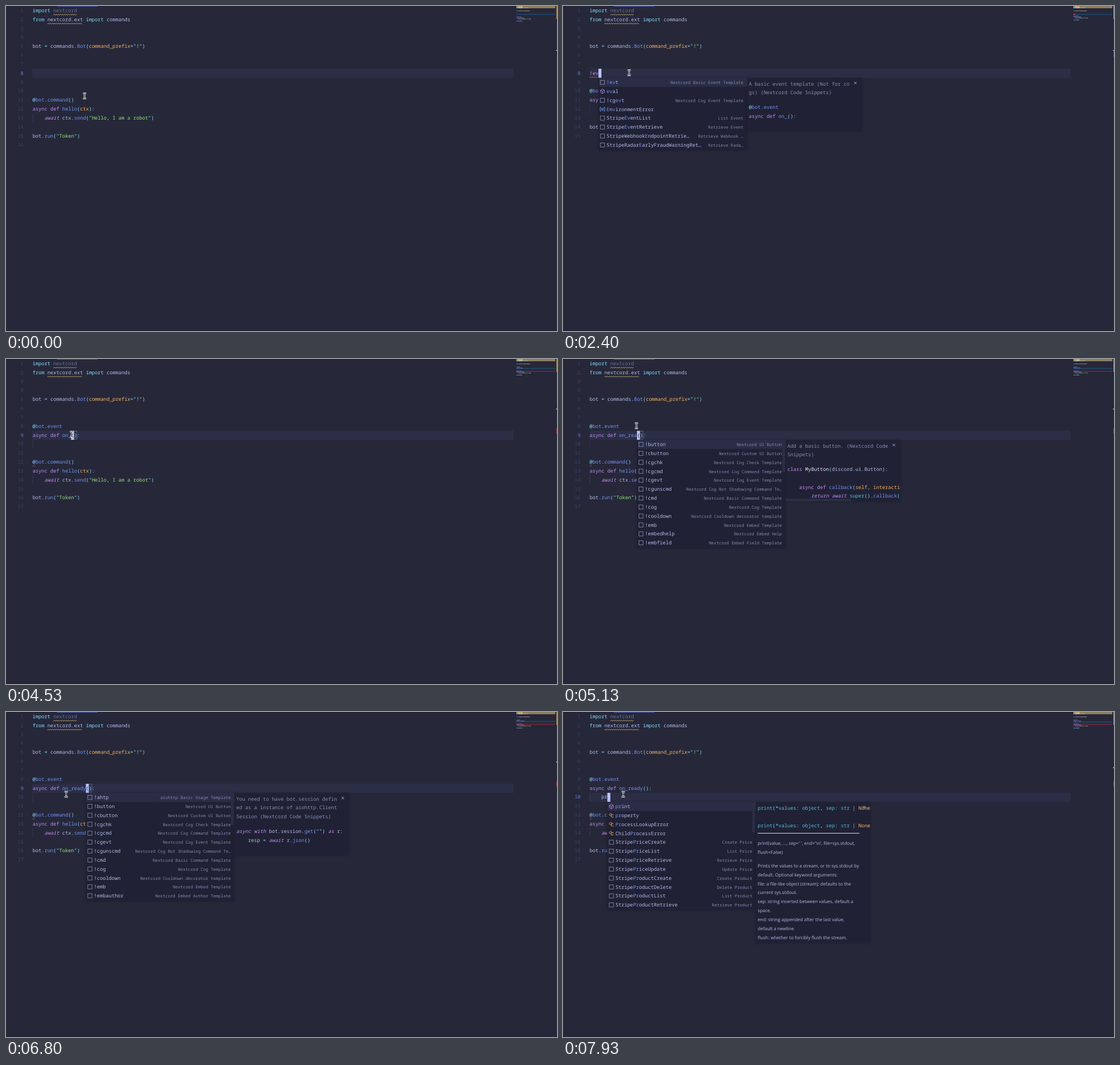
An HTML page with a canvas for the animation above (8 s loop, 975 by 575 pixels).

```html
<!DOCTYPE html>
<html lang="en">
<head>
<meta charset="utf-8">
<title>Editor session</title>
<style>
  html, body { margin: 0; height: 100%; overflow: hidden; background: #26283a; }
  canvas { display: block; }
</style>
</head>
<body>
<canvas id="stage" width="975" height="575"></canvas>
<script>
const ctx = document.getElementById('stage').getContext('2d');
const LOOP = 8000, LEFT = 47, CHAR = 5.244, ROW = 15.83;
const MONO = '8.74px "Noto Sans Mono", monospace';
const SMALL = '7.43px "Noto Sans Mono", monospace';
const SANS = '8.03px "Open Sans", sans-serif';

// Colour keys used after "~" in marked-up text; "i" is also italic.
const COLORS = {
  f: '#b4bce6', c: '#86dcfa', b: '#7492f2', p: '#c48cf2', i: '#c48cf2', o: '#f8b45c',
  n: '#94e478', g: '#6c7196', d: '#8a8fb4', t: '#50c2dc', w: '#e4e8ff'
};

const HEAD = [
  '~cimport ~gnextcord',
  '~cfrom ~fnextcord~c.~fext ~cimport ~fcommands',
  '', '',
  'bot ~c= ~fcommands~c.~bBot~c(~ocommand_prefix~c="~n!~c")',
  '', ''
];
const TAIL = [
  '~c@~bbot~c.~bcommand~c()',
  '~pasync def ~bhello~c(~octx~c):',
  '    ~iawait ~fctx~c.~bsend~c("~nHello, I am a robot~c")',
  '',
  'bot~c.~brun~c("~nToken~c")',
  ''
];

// Completion rows: label|detail|icon, with matched letters in brackets.
const SNIPPETS = [
  '!button|Nextcord UI Button', '!cbutton|Nextcord Custom UI Button',
  '!cgchk|Nextcord Cog Check Template', '!cgcmd|Nextcord Cog Command Template',
  '!cgevt|Nextcord Cog Event Template', '!cgunscmd|Nextcord Cog Not Shadowing Command Te…',
  '!cmd|Nextcord Basic Command Template', '!cog|Nextcord Cog Template',
  '!cooldown|Nextcord Cooldown decorator template', '!emb|Nextcord Embed Template'
];
const POPUPS = {
  all: {
    rows: ['!ahtp|aiohttp Basic Usage Template', ...SNIPPETS, '!embauthor|Nextcord Embed Author Template'],
    slider: 56, height: 111,
    blocks: [
      [10.5, MONO, ['~dYou need to have bot.session defin', '~ded as a instance of aiohttp.Client', '~dSession (Nextcord Code Snippets)']],
      [68, MONO, ['~iasync with ~fbot.session.~bget~c("") ~ias ~fr:', '    resp ~c= ~iawait ~fr.~bjson~c()']]
    ]
  },
  event: {
    rows: [
      '[!ev]t|Nextcord Basic Event Template', '[ev]al||cube', '!cg[ev]t|Nextcord Cog Event Template',
      '[E]n[v]ironmentError||value', 'Stripe[Ev]entList|List Event', 'Stripe[Ev]entRetrieve|Retrieve Event',
      'StripeWebhook[E]ndpointRetrie…|Retrieve Webhook …', 'StripeRadar[E]arlyFraudWarningRet…|Retrieve Rada…'
    ],
    slider: 0, height: 95,
    blocks: [
      [10.5, MONO, ['~dA basic event template (Not for co', '~dgs) (Nextcord Code Snippets)']],
      [52, MONO, ['~c@~bbot~c.~bevent', '~pasync def ~bon_~c():']]
    ]
  },
  button: {
    rows: [...SNIPPETS, '!embedhelp|Nextcord Embed Help', '!embfield|Nextcord Embed Field Template'],
    slider: 56, height: 110, scrollX: 116,
    blocks: [
      [10.5, MONO, ['~dAdd a basic button. (Nextcord Code', '~dSnippets)']],
      [52, MONO, ['~pclass ~wMyButton~c(~fdiscord~c.~fui~c.~fButton~c):', '',
        '    ~pasync def ~bcallback~c(~oself~c, ~ointeraction~c):',
        '        ~ireturn await ~tsuper~c().~bcallback~c(interaction)']]
    ]
  },
  print: {
    rows: [
      '[pr]int||cube', '[pr]operty||class', '[Pr]ocessLookupError||class', 'Child[Pr]ocessError||class',
      'Stripe[Pr]iceCreate|Create Price', 'Stripe[Pr]iceList|List Price', 'Stripe[Pr]iceRetrieve|Retrieve Price',
      'Stripe[Pr]iceUpdate|Update Price', 'Stripe[Pr]oductCreate|Create Product', 'Stripe[Pr]oductDelete|Delete Product',
      'Stripe[Pr]oductList|List Product', 'Stripe[Pr]oductRetrieve|Retrieve Product'
    ],
    slider: 53, height: 250, rule: 55,
    blocks: [
      [10.5, MONO, ['~tprint~c(*~tvalues~c: ~tobject~c, ~tsep~c: ~tstr ~f| ~oNone', '',
        '~tprint~c(*~tvalues~c: ~tobject~c, ~tsep~c: ~tstr ~f| ~oNone']],
      [73, SANS, ["print(value, ..., sep=' ', end='\\n', file=sys.stdout,", 'flush=False)']],
      [113, SANS, ['Prints the values to a stream, or to sys.stdout by', 'default. Optional keyword arguments:',
        'file: a file-like object (stream); defaults to the', 'current sys.stdout.',
        'sep: string inserted between values, default a', 'space.',
        'end: string appended after the last value,', 'default a newline.',
        'flush: whether to forcibly flush the stream.']]
    ]
  }
};

const MOUSE = [
  [0, 139, 159], [70, 139, 159], [270, 111, 132], [470, 111, 132], [670, 116, 125], [870, 116, 125],
  [930, 117, 118], [3400, 117, 118], [3800, 60, 140], [4200, 116, 140], [4470, 116, 133], [4600, 116, 133],
  [4730, 130, 118], [5670, 130, 118], [6470, 120, 130], [6530, 120, 130], [6800, 106.5, 145.5], [LOOP, 106.5, 145.5]
];

// Steps are [time, value]; the last one reached holds.
const held = (t, steps) => steps.filter(s => t >= s[0]).pop()[1];
const rowY = n => 8 + (n - 1) * ROW;
const colX = n => LEFT + n * CHAR;

function fill(color, x, y, w, h) {
  ctx.fillStyle = color;
  ctx.fillRect(x, y, w, h);
}

function text(str, x, y, color, font = MONO, align = 'left') {
  ctx.font = font;
  ctx.textAlign = align;
  ctx.fillStyle = color;
  ctx.fillText(str, x, y + 3);
}

function runs(markup) {
  let col = 0;
  return ('f' + markup).split('~').map(part => {
    const run = { key: part[0], str: part.slice(1), col };
    col += run.str.length;
    return run;
  });
}

function code(markup, x, y) {
  for (const { key, str, col } of runs(markup))
    text(str, x + col * CHAR, y, COLORS[key], (key === 'i' ? 'italic ' : '') + MONO);
}

function stroke(color, width, ...points) {
  ctx.strokeStyle = color;
  ctx.lineWidth = width;
  ctx.beginPath();
  points.forEach(([x, y]) => ctx.lineTo(x, y));
  ctx.stroke();
}

function squiggle(line, from, to, color) {
  const points = [];
  for (let x = colX(from), i = 0; x <= colX(to); x += 1.8, i++)
    points.push([x, rowY(line) + (i % 2 ? 6.6 : 8)]);
  stroke(color, 0.9, ...points);
}

function icon(kind, x, y) {
  if (kind === 'cube') {
    const r = a => [x + 4 * Math.sin(a * Math.PI / 3), y - 4 * Math.cos(a * Math.PI / 3)];
    stroke('#b085dc', 0.9, ...[0, 1, 2, 3, 4, 5, 6].map(r));
    stroke('#b085dc', 0.9, r(5), [x, y], r(1));
    stroke('#b085dc', 0.9, [x, y], r(3));
  } else if (kind === 'class') {
    stroke('#f0a04c', 1, [x - 4, y - 1], [x - 1, y - 4], [x + 1, y - 2], [x - 2, y + 1], [x - 4, y - 1]);
    stroke('#f0a04c', 0.9, [x, y - 1], [x + 4, y - 1]);
    stroke('#f0a04c', 0.9, [x, y - 1], [x, y + 3], [x + 4, y + 3]);
  } else if (kind === 'value') {
    stroke('#6fa6f4', 0.9, [x - 2.5, y - 3.5], [x - 4, y - 3.5], [x - 4, y + 3.5], [x - 2.5, y + 3.5]);
    stroke('#6fa6f4', 0.9, [x + 2.5, y - 3.5], [x + 4, y - 3.5], [x + 4, y + 3.5], [x + 2.5, y + 3.5]);
    ctx.strokeRect(x - 1.5, y - 1.5, 3, 3);
  } else {
    ctx.strokeStyle = '#8f95b8';
    ctx.lineWidth = 0.8;
    ctx.strokeRect(x - 3.7, y - 3.7, 7.4, 7.4);
  }
}

function panel(x, y, w, h) {
  ctx.save();
  ctx.shadowColor = 'rgba(0,0,0,.25)';
  ctx.shadowBlur = 4;
  fill('#202134', x, y, w, h);
  ctx.restore();
}

function popup({ rows, slider, height, blocks, rule, scrollX }, x, top) {
  const left = Math.round(x), docs = left + 263;
  panel(left, top, 263, Math.round(rows.length * ROW + 2));
  panel(docs, top, 203, height);
  fill('#2b2d46', left + 1, top, 262, 16);
  fill('#2b2d43', left + 257, top + 1, 5, slider);
  rows.forEach((row, i) => {
    const [label, detail, kind] = row.split('|');
    const y = top + 8.1 + i * ROW;
    let lx = x + 14.4;
    icon(kind, x + 7.3, y);
    label.split(/[[\]]/).forEach((piece, k) => {
      text(piece, lx, y, k % 2 ? '#7492f2' : COLORS.f);
      lx += piece.length * CHAR;
    });
    text(detail, x + 256.6, y, '#8388ae', SMALL, 'right');
  });

  ctx.save();
  ctx.beginPath();
  ctx.rect(docs, top, 203, height);
  ctx.clip();
  for (const [dy, font, lines] of blocks)
    lines.forEach((line, i) => {
      const y = top + dy + i * ROW;
      font === SANS ? text(line, x + 266.3, y, COLORS.f, SANS) : code(line, x + 266.3, y);
    });
  if (rule) fill('#d8dcf4', x + 266.3, top + rule, 180, 1);
  if (scrollX) fill('#2b2d43', docs, top + height - 6, scrollX, 5);
  stroke('#b4bce6', 0.9, [x + 452.5, top + 7], [x + 457, top + 11.5]);
  stroke('#b4bce6', 0.9, [x + 457, top + 7], [x + 452.5, top + 11.5]);
  ctx.restore();
}

function minimap(lines, active, error) {
  const mapY = n => 0.4 + (n - 1) * 1.8;
  const band = n => Math.round(mapY(n) + 0.8);
  fill('#8d7c5e', 903, 0, 69, 4);
  fill('#e6b65c', 907, 0, 7, 4);
  fill('#214a6e', 903, band(active), 69, 1.5);
  if (error === 12) fill('#80253a', 903, band(12), 69, 1.5);
  if (error === 8) fill('#d84a48', 903, band(8), 3, 1.5);
  ctx.globalAlpha = 0.6;
  lines.forEach((line, i) => {
    for (const { key, str, col } of runs(line))
      for (const word of str.matchAll(/\S+/g))
        fill(COLORS[key], 903.5 + (col + word.index) * 0.62, mapY(i + 1) + 0.5, word[0].length * 0.62, 1.1);
  });
  ctx.globalAlpha = 1;
  fill('#c99a55', 974, 0, 1, 23);
  if (error) fill('#b03638', 974, Math.round(error * 10.6 - 5), 1, 10);
  fill('#c4c8e0', 973, Math.round(active * 9.85 - 0.5), 2, 1);
}

function pointer(t) {
  const k = MOUSE.findIndex(m => m[0] > t);
  const [t0, x0, y0] = MOUSE[k - 1], [t1, x1, y1] = MOUSE[k];
  const u = (t - t0) / (t1 - t0);
  const x = x0 + (x1 - x0) * u, y = y0 + (y1 - y0) * u;
  for (const [color, width] of [['#f4f4f8', 2.6], ['#15161f', 0.9]]) {
    stroke(color, width, [x - 3, y - 5], [x - 1, y - 4.6], [x, y - 3.5], [x + 1, y - 4.6], [x + 3, y - 5]);
    stroke(color, width, [x - 3, y + 5], [x - 1, y + 4.6], [x, y + 3.5], [x + 1, y + 4.6], [x + 3, y + 5]);
    stroke(color, width, [x, y - 4], [x, y + 4]);
    stroke(color, width, [x - 1.5, y], [x + 1.5, y]);
  }
}

function draw(t) {
  const command = held(t, [[0, ''], [2000, '!'], [2270, '!e'], [2330, '!ev']]);
  const name = 'on_' + held(t, [[0, ''], [4870, 'r'], [4930, 're'], [5000, 'rea'], [5670, 'read'], [5870, 'ready']]);
  const body = held(t, [[0, ''], [7470, 'p'], [7670, 'pr']]);
  const expanded = t >= 2870;
  const middle = expanded
    ? ['~c@~bbot~c.~bevent', `~pasync def ~b${name}~c():`, '    ' + body, '']
    : t < 1470 ? ['', '', ''] : ['~p' + command, ''];
  const lines = [...HEAD, ...middle, ...TAIL];
  const active = held(t, [[0, 8], [470, 9], [1070, 8], [4270, 9], [6870, 10]]);
  const col = active === 10 ? 4 + body.length
    : expanded ? (active === 9 ? 10 + name.length : 10) : command.length;
  const error = expanded ? 12 : command ? 8 : 0;
  const menu = held(t, [[0, ''], [2130, 'all'], [2400, 'event'], [2870, ''], [5070, 'button'],
    [5670, 'all'], [6870, ''], [7600, 'print']]);
  const activeTop = Math.round(rowY(active) - 7.6);

  fill('#26283a', 0, 0, 975, 575);
  fill('#1d1e2e', 0, 0, 975, 1);
  fill('#4a56a8', 90, 0, 72, 1);
  fill('#1d1e2e', 0, 574, 975, 1);
  fill('#2c2e46', LEFT, activeTop, 851, 16);

  lines.forEach((line, i) => {
    const n = i + 1;
    text(n, 31, rowY(n), n === active ? '#7078d0' : '#3e415c', MONO, 'right');
    code(line, LEFT, rowY(n));
    if (line.startsWith('    ')) fill('#34374f', LEFT, rowY(n) - 8, 1, ROW);
  });
  squiggle(1, 7, 15, '#c9b071');
  squiggle(2, 5, 17, '#c9b071');
  if (error === 8) squiggle(8, 0, command.length, '#e0504e');
  if (error === 12) squiggle(12, 0, 1, '#e0504e');

  if (t >= 470) {
    const x = colX(col), y = rowY(active);
    fill('#bcc4fa', x, activeTop, 5.3, 16);
    if (expanded && active === 9) {
      text('(', x, y, '#26283a');
      ctx.strokeStyle = '#70759a';
      ctx.lineWidth = 0.7;
      ctx.strokeRect(x + CHAR, y - 7.2, CHAR, 14.5);
    }
  }
  minimap(lines, active, error);
  if (menu) popup(POPUPS[menu], colX(col) - 0.2, activeTop + 16);
  pointer(t);
}

ctx.textRendering = 'geometricPrecision';
(function frame() {
  draw(performance.now() % LOOP);
  requestAnimationFrame(frame);
})();
</script>
</body>
</html>
```
